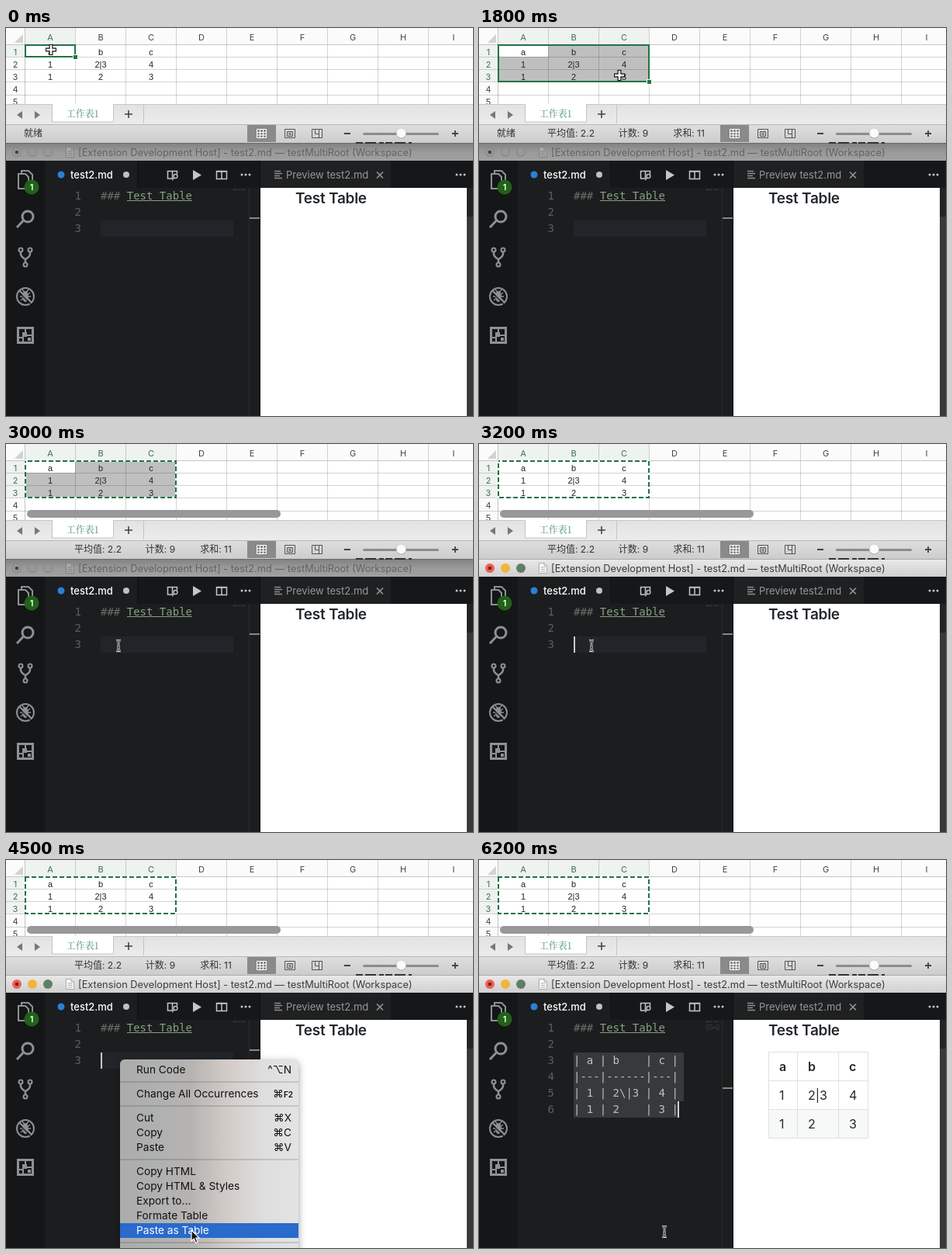
These frames come from a looping animation (602 by 500 pixels, 8.2 s). An HTML page with a canvas:

```html
<!DOCTYPE html>
<html lang="zh">
<head>
<meta charset="utf-8">
<title>Paste as Table</title>
<style>
  html, body { margin: 0; width: 100%; height: 100%; overflow: hidden; background: #1c1d1e; }
  canvas { display: block; }
</style>
</head>
<body>
<canvas id="stage" width="602" height="500"></canvas>
<script>
const ctx = document.getElementById('stage').getContext('2d');
const LOOP = 8200;
const UI = 'Inter, "Noto Sans CJK SC", "Noto Sans CJK", sans-serif';
const MONO = '14px "DejaVu Sans Mono", monospace';
const GREEN = '#217346', ICON = '#8d9194';

// Timelines: each entry holds until the next one starts.
const pointer = [
  [0, 'cross', 58, 28], [400, 'cross', 63, 31], [600, 'cross', 104, 45], [800, 'cross', 142, 49],
  [1000, 'cross', 161, 53], [1200, 'cross', 178, 56], [1400, 'cross', 183, 61], [1600, 'cross', 181, 61],
  [2200, 'arrow', 192, 203], [2400, 'arrow', 197, 312], [2600, 'arrow', 178, 288], [2800, 'arrow', 162, 270],
  [3000, 'beam', 145, 260], [4100, 'beam', 146, 266], [4300, 'arrow', 146, 256],
  [4500, 'arrow', 239, 477], [6000, 'beam', 239, 479]
];
const selection = [
  [0, 89, 37], [600, 130, 47], [800, 154, 53], [1000, 213, 53], [1200, 219, 53], [1400, 219, 69]
];
const stats = [[0], [600, '1', 4, 1], [1000, '2.5', 6, 5], [1400, '2.2', 9, 11]];
const at = (track, t) => track.filter(k => k[0] <= t).pop();

function rect(x, y, w, h, color) {
  ctx.fillStyle = color;
  ctx.fillRect(x, y, w, h);
}
function round(x, y, w, h, r, color) {
  ctx.fillStyle = color;
  ctx.beginPath();
  ctx.roundRect(x, y, w, h, r);
  ctx.fill();
}
function disc(x, y, r, color) { round(x - r, y - r, 2 * r, 2 * r, r, color); }
function gradient(x0, y0, x1, y1, ...colors) {
  const g = ctx.createLinearGradient(x0, y0, x1, y1);
  colors.forEach((c, i) => g.addColorStop(i / (colors.length - 1), c));
  return g;
}
function text(str, x, y, color, font = '13px ' + UI, align = 'left') {
  ctx.font = font;
  ctx.textAlign = align;
  ctx.fillStyle = color;
  ctx.fillText(str, x, y);
}
function stroke(d, color, width = 1) {
  ctx.strokeStyle = color;
  ctx.lineWidth = width;
  ctx.stroke(new Path2D(d));
}
function fill(d, color) {
  ctx.fillStyle = color;
  ctx.fill(new Path2D(d));
}

function drawSheet(t) {
  const [, right, bottom] = at(selection, t);
  const copied = t >= 2200, focused = t < 3200;
  rect(0, 0, 602, 98, '#fff');
  rect(0, 0, 602, 21, '#fbfbfb');
  rect(0, 21, 24, 77, '#fbfbfb');
  fill('M22 8V19H11Z', '#d2d2d2');
  rect(24, 0, right - 24, 21, '#eff3f0');
  rect(0, 21, 24, bottom - 21, '#eff3f0');
  if (focused && (right > 89 || bottom > 37)) {
    rect(24, 21, right - 24, bottom - 21, '#bfbfbf');
    rect(25, 22, 64, 15, '#fff');
  }

  const grid = 'rgba(0,0,0,.17)', font = '11px ' + UI;
  for (let i = 0; i < 9; i++) {
    const x = 24 + 65 * i;
    rect(x, 0, 1, 98, i ? grid : '#c4c4c4');
    text('ABCDEFGHI'[i], x + 33, 16, x < right - 8 ? '#3f6f57' : '#444', font, 'center');
  }
  [21, 37, 53, 69, 86].forEach((y, i) => {
    rect(0, y, 602, 1, i ? grid : '#c4c4c4');
    text(i + 1, 12, 34.5 + 16 * i, y < bottom - 5 ? '#3f6f57' : '#444', font, 'center');
  });
  [['a', 'b', 'c'], ['1', '2|3', '4'], ['1', '2', '3']].forEach((row, r) => row.forEach((cell, c) =>
    text(cell, 57 + 65 * c, 34.5 + 16 * r, '#222', '11px "Liberation Sans", Arial, sans-serif', 'center')));

  const border = `M25 22H${right}V${bottom}H25Z`;
  if (copied) {
    stroke(border, '#fff', 2);
    ctx.setLineDash([6, 3]);
    ctx.lineDashOffset = -2 * Math.floor(t / 200);
    stroke(border, GREEN, 2);
    ctx.setLineDash([]);
  } else {
    stroke(border, GREEN, 2);
    rect(right - 3, bottom - 3, 7, 7, '#fff');
    rect(right - 2, bottom - 2, 5, 5, GREEN);
  }
  if (t >= 2400) round(27, 85, 327, 10, 5, '#989898');
}

function drawSheetFooter(t) {
  rect(0, 98, 602, 26, gradient(0, 98, 0, 124, '#e2e2e2', '#ececec'));
  rect(0, 98, 602, 1, '#c6c6c6');
  fill('M21 107V117L14 112ZM37 107V117L44 112Z', '#777');
  rect(59, 98, 80, 23, '#fff');
  stroke('M59.5 98V121H138.5V98', '#c4c4c4');
  text('工作表1', 98.5, 115, '#4b9272', '12px "Noto Serif CJK SC", "Noto Sans CJK SC", "Noto Sans CJK", serif', 'center');
  stroke('M153 111H163M158 106V116', '#444', 1.6);
  stroke('M177.5 99V123', '#c4c4c4');

  rect(0, 124, 602, 24, gradient(0, 124, 0, 148, '#dedede', '#cdcdcd'));
  rect(0, 124, 602, 1, '#b8b8b8');
  const font = '12px ' + UI;
  if (t < 2200) text('就绪', 23, 140, '#333', font);
  const [, mean, count, sum] = at(stats, t);
  if (mean) {
    text('平均值: ' + mean, 118.5, 140, '#333', font, 'center');
    text('计数: ' + count, 199, 140, '#333', font, 'center');
    text('求和: ' + sum, 270.5, 140, '#333', font, 'center');
  }
  rect(311, 125, 37, 22, '#8a8a8a');
  stroke('M323.5 130.5H335.5V141.5H323.5ZM327.5 130V142M331.5 130V142M323 134.5H336M323 138H336', '#fff');
  stroke('M359.5 130.5H372.5V141.5H359.5ZM362.5 133.5H369.5V139.5H362.5ZM364 135.5H368M364 137.5H368', '#555');
  stroke('M394.5 130.5H407.5V141.5H394.5ZM398.5 130V136.5H403.5V130M403.5 136.5V141', '#555');
  stroke('M436 136H444M575 136H583M579 132V140', '#444', 1.8);
  round(460, 135, 98, 3, 1.5, '#8c8c8c');
  disc(509.5, 136, 6.5, '#aaa');
  disc(509.5, 135.5, 6, '#fafafa');
}

function drawTitleBar(active) {
  rect(0, 148, 602, 23, active ? gradient(0, 148, 0, 171, '#e9e9e9', '#d0d0d0')
                               : gradient(0, 148, 0, 171, '#808080', '#9a9a9a', '#a0a0a0'));
  rect(0, 148, 602, 1, active ? '#aaa' : '#6c6c6c');
  ctx.setLineDash([9, 3, 14, 4, 6, 2]);
  ctx.lineDashOffset = 0;
  stroke('M451 148H523', '#333', 2);
  ctx.setLineDash([]);
  ['#ec6057', '#f2b43a', '#5f8064'].forEach((color, i) => {
    disc(14 + 20 * i, 160, 6, active ? color : '#858585');
    if (!active) disc(14 + 20 * i, 160, 5, '#999');
  });
  disc(14, 160, 2.3, active ? '#7c1d18' : '#444');
  fill('M77 153H84L88 157V167H77Z', active ? '#fafafa' : '#a8a8a8');
  stroke('M77.5 153.5H84L87.5 157V166.5H77.5ZM84 153.5V157H87.5M79.5 159H85.5M79.5 161.5H85.5M79.5 164H85.5', active ? '#999' : '#7c7c7c', .8);
  text('[Extension Development Host] - test2.md — testMultiRoot (Workspace)', 93, 164.5,
    active ? '#3c3c3c' : '#626262', '12.8px ' + UI);
}

function drawActivityBar() {
  rect(0, 171, 50, 329, '#151617');
  stroke('M20 188V184H29L34 189V201H28M16 188H25L29 192V207H16Z', ICON, 2);
  disc(33, 205, 9.5, '#22611a');
  text('1', 33, 209, '#fff', '600 11px ' + UI, 'center');
  stroke('M35 243A7 7 0 1 1 21 243A7 7 0 1 1 35 243M22.5 248L14 257', ICON, 3);
  stroke('M19 288V291Q19 295 25 298Q31 295 31 291V288M25 298V303', ICON, 2.5);
  for (const [x, y] of [[19, 286], [31, 286], [25, 305]]) {
    disc(x, y, 3.5, ICON);
    disc(x, y, 1.4, '#151617');
  }
  stroke('M36 346A11 11 0 1 1 14 346A11 11 0 1 1 36 346M17.5 338.5L32.5 353.5', ICON, 2);
  stroke('M18 346H32M19 341L31 351M31 341L19 351M21 337L24 341M29 337L26 341', ICON, 1.3);
  fill('M25 339C30 339 30 353 25 353C20 353 20 339 25 339', ICON);
  stroke('M18 342L32 356', '#151617', 1.2);
  stroke('M15.5 386.5H34.5V405.5H15.5Z', ICON, 3);
  stroke('M25 386V396H34M16 399H22V405', ICON, 2);
  rect(21, 392, 6, 6, ICON);
  rect(28, 399, 4, 4, ICON);
}

function dots(x) {
  for (let i = -1; i < 2; i++) disc(x + 5 * i, 189, 1.5, '#c5c5c5');
}

function drawTabs() {
  rect(50, 171, 552, 35, '#151718');
  rect(50, 171, 119, 35, '#1c1d1e');
  rect(328, 171, 168, 35, '#1e2021');
  rect(169, 171, 1, 35, '#101112');
  disc(71, 189, 4.5, '#2f7fd6');
  text('test2.md', 83, 194, '#fff', '500 13px ' + UI);
  disc(155, 189, 4, '#bfbfbf');
  stroke('M214 194H208.5V184.5H220.5V188M214.5 185V194', '#c5c5c5', 1.5);
  stroke('M221 191A2.5 2.5 0 1 1 216 191A2.5 2.5 0 1 1 221 191M217 193L214 196', '#c5c5c5', 1.3);
  fill('M241 183L252 189.5L241 196Z', '#c5c5c5');
  stroke('M271.5 184.5H284.5V194.5H271.5ZM278 184V195M271 185H285', '#c5c5c5', 1.5);
  dots(309);
  stroke('M346 184.5H354M346 187.5H356M346 190.5H353M346 193.5H356', '#8d8d8d', 1.3);
  text('Preview test2.md', 361, 194, '#979797');
  stroke('M478 185.5L486 193.5M486 185.5L478 193.5', '#979797', 1.6);
  dots(586);
}

function drawEditor(t) {
  const pasted = t >= 6000;
  const table = ['| a | b    | c |', '|---|------|---|', '| 1 | 2\\|3 | 4 |', '| 1 | 2    | 3 |'];
  rect(50, 206, 277, 294, '#1c1d1e');
  if (pasted) {
    rect(122, 248, 142, 63, '#37393b');
    rect(122, 311, 135, 21, '#37393b');
  } else {
    rect(122, 248, 171, 21, '#212529');
  }
  for (let i = 0; i < (pasted ? 6 : 3); i++) text(i + 1, 97, 221 + 21 * i, '#5c5f61', MONO, 'right');
  text('###', 122, 221, '#667068', MONO);
  text('Test Table', 155.7, 221, '#87a083', MONO);
  rect(156, 222, 84, 1, '#87a083');

  const tiny = '1.8px "DejaVu Sans Mono", monospace';
  text('### Test Table', 293, 208.5, '#7b8a7b', tiny);
  if (pasted) table.forEach((row, i) => {
    text(row, 122, 263 + 21 * i, '#bcc1c4', MONO);
    text(row, 293, 212.5 + 2 * i, '#aaa', tiny);
  });
  rect(313, 206, 1, 294, '#2a2b2c');
  rect(314, pasted ? 293 : 244, 13, 2, '#85888a');
  rect(327, 171, 1, 329, '#0e0f10');

  const caretOn = t >= 3200 && !(t >= 3900 && t < 4100);
  if (pasted) rect(256, 311, 2, 21, '#d0d0d0');
  else if (caretOn) rect(122, 248, 2, 21, '#c8c8c8');
}

function drawPreview(t) {
  rect(328, 206, 266, 294, '#fff');
  rect(594, 206, 8, 294, '#37393b');
  rect(594, 206, 8, 37, '#222425');
  ctx.letterSpacing = '-0.25px';
  text('Test Table', 373, 226, '#24292e', '600 19px ' + UI);
  ctx.letterSpacing = '0px';
  if (t < 6200) return;
  rect(373, 321, 128, 37, '#f7f8f8');
  stroke('M373.5 247.5H501.5V358.5H373.5ZM410.5 247V358M463.5 247V358M373 284.5H501M373 321.5H501', '#dfe1e3');
  [['a', 'b', 'c'], ['1', '2|3', '4'], ['1', '2', '3']].forEach((row, r) => row.forEach((cell, c) =>
    text(cell, [387, 424, 477][c], 272 + 37 * r, '#24292e', (r ? '' : '600 ') + '16px ' + UI)));
}

function drawMenu(t) {
  const items = [
    [270, 'Run Code', '^⌥N'], [301, 'Change All Occurrences', '⌘F2'],
    [332, 'Cut', '⌘X'], [351, 'Copy', '⌘C'], [370, 'Paste', '⌘V'],
    [401, 'Copy HTML'], [420, 'Copy HTML & Styles'], [439, 'Export to...'],
    [458, 'Formate Table'], [477, 'Paste as Table']
  ];
  const font = '13.7px Inter, "DejaVu Sans", sans-serif';
  ctx.save();
  ctx.shadowColor = 'rgba(0,0,0,.4)';
  ctx.shadowBlur = 10;
  ctx.shadowOffsetY = 3;
  round(147, 257, 230, 260, 6, gradient(147, 0, 377, 0, '#acacac', '#afb0b0', '#b6b4b2', '#d2cbc8', '#dedede', '#e3e3e3'));
  ctx.restore();
  for (const y of [286, 317, 386, 493]) rect(147, y - 1, 230, 2, 'rgba(0,0,0,.13)');
  for (const [y, label, keys] of items) {
    const chosen = y === 477 && t >= 4500;
    if (chosen) rect(147, 468, 230, 19, '#296acb');
    text(label, 168, y + 5, chosen ? '#fff' : '#111', font);
    if (keys === '⌘F2') {
      text('⌘', 344, y + 5, '#111', font);
      text('F2', 370, y + 5, '#111', '600 10px ' + UI, 'right');
    } else if (keys) {
      text(keys, 368, y + 5, '#111', font, 'right');
    }
  }
}

function drawPointer(t) {
  const [, kind, x, y] = at(pointer, t);
  ctx.save();
  ctx.translate(x, y);
  if (kind === 'cross') {
    stroke('M-7 0H7M0 -7V7', '#111', 5);
    stroke('M-6 0H6M0 -6V6', '#fff', 2.6);
  } else if (kind === 'arrow') {
    const shape = 'M0 0V14L3.3 11L5.7 16.5L8.2 15.4L5.8 10.2H10.2Z';
    fill(shape, '#111');
    stroke(shape, '#fff', 1.2);
  } else {
    const shape = 'M-3 -7Q0 -7 0 -5V5Q0 7 -3 7M3 -7Q0 -7 0 -5M0 5Q0 7 3 7M-2 2H2';
    stroke(shape, '#eee', 2.6);
    stroke(shape, '#222', 1);
  }
  ctx.restore();
}

function draw() {
  const t = performance.now() % LOOP;
  drawSheet(t);
  drawSheetFooter(t);
  drawTitleBar(t >= 3200);
  drawActivityBar();
  drawTabs();
  drawEditor(t);
  drawPreview(t);
  if (t >= 4300 && t < 5500) drawMenu(t);
  drawPointer(t);
  requestAnimationFrame(draw);
}
draw();
</script>
</body>
</html>
```
